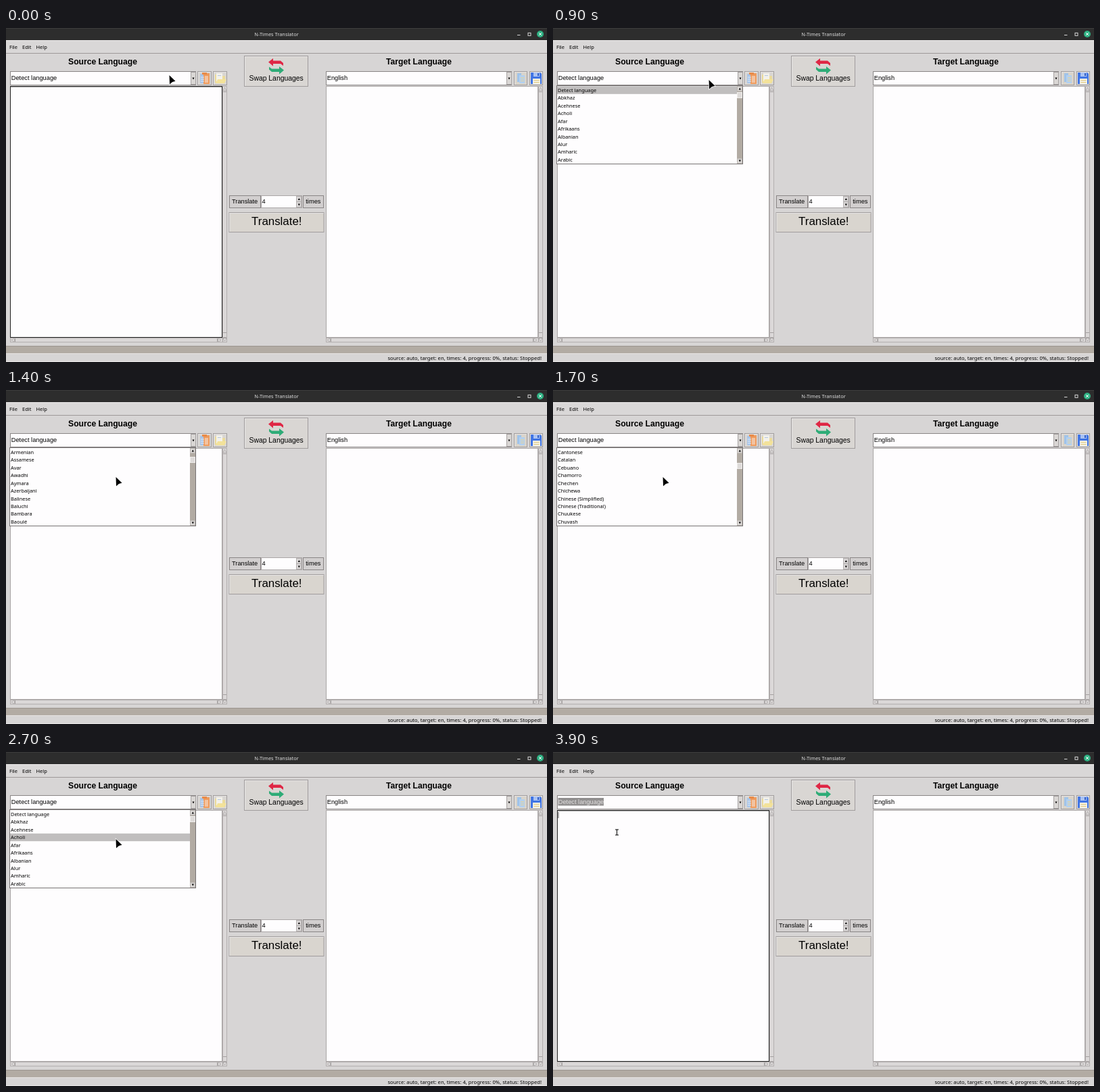
Recreate the animation shown at these times as an HTML page with a canvas. Size 800 by 495 pixels, loop 4 s.

```html
<!DOCTYPE html>
<html lang="en">
<head>
<meta charset="utf-8">
<title>N-Times Translator</title>
<style>
html, body { margin: 0; width: 800px; height: 495px; overflow: hidden; background: #d7d5d5; }
canvas { display: block; }
</style>
</head>
<body>
<canvas id="stage" width="800" height="495"></canvas>
<script>
const ctx = document.getElementById('stage').getContext('2d');
const SANS = '"Liberation Sans", Arial, sans-serif';
const NOTO = '"Noto Sans", sans-serif';
const LOOP = 4000, STEP = 100;
const OPEN = 700, CLOSE = 3500, FOCUS = 3700;
const ROWS = 10, ROW_H = 11.45, LIST_TOP = 86.4;

const languages = ('Detect language,Abkhaz,Acehnese,Acholi,Afar,Afrikaans,Albanian,Alur,Amharic,Arabic,' +
  'Armenian,Assamese,Avar,Awadhi,Aymara,Azerbaijani,Balinese,Baluchi,Bambara,Baoulé,Bashkir,Basque,' +
  'Batak Karo,Batak Simalungun,Batak Toba,Belarusian,Bemba,Bengali,Betawi,Bhojpuri,Bikol,Bosnian,' +
  'Breton,Bulgarian,Buryat,Cantonese,Catalan,Cebuano,Chamorro,Chechen,Chichewa,Chinese (Simplified),' +
  'Chinese (Traditional),Chuukese,Chuvash').split(',');

// Each key is [time, value, ...]
const mousePath = [[0, 241, 70], [500, 236, 73], [900, 230, 77], [1200, 184, 121], [1400, 162, 129],
  [2700, 162, 129], [3300, 105, 90], [3800, 94.5, 119], [LOOP, 94.5, 119]];
const scrollPath = [[0, 0], [1300, 0], [1650, 35], [1900, 35], [2300, 15], [2600, 0], [LOOP, 0]];

function sample(path, t) {
  const i = path.findIndex(key => key[0] > t);
  const a = path[i - 1], b = path[i];
  const k = (t - a[0]) / (b[0] - a[0]);
  return a.slice(1).map((v, n) => v + (b[n + 1] - v) * k);
}

function rect(x, y, w, h, color) {
  ctx.fillStyle = color;
  ctx.fillRect(x, y, w, h);
}

function box(x, y, w, h, fill, stroke = '#8d8989') {
  rect(x, y, w, h, stroke);
  rect(x + 1, y + 1, w - 2, h - 2, fill);
}

function text(str, x, y, size, { font = SANS, color = '#000', align = 'left', weight = 400 } = {}) {
  ctx.font = `${weight} ${size}px ${font}`;
  ctx.textAlign = align;
  ctx.fillStyle = color;
  ctx.fillText(str, x, y);
}

function poly(points, fill, stroke, width = 1) {
  ctx.beginPath();
  points.forEach(([x, y]) => ctx.lineTo(x, y));
  ctx.closePath();
  if (stroke) {
    ctx.strokeStyle = stroke;
    ctx.lineWidth = width;
    ctx.stroke();
  }
  if (fill) {
    ctx.fillStyle = fill;
    ctx.fill();
  }
}

function line(points, color, width = 1) {
  ctx.beginPath();
  points.forEach(([x, y]) => ctx.lineTo(x, y));
  ctx.strokeStyle = color;
  ctx.lineWidth = width;
  ctx.stroke();
}

// Triangle pointing along the unit vector (dx, dy)
function triangle(x, y, dx, dy, r, fill, stroke) {
  poly([[x + dx * r, y + dy * r], [x - dx * r + dy * r, y - dy * r + dx * r],
    [x - dx * r - dy * r, y - dy * r - dx * r]], fill, stroke, 0.7);
}

function button(x, y, w, h, fill = '#d9d6d3') {
  box(x, y, w, h, fill, '#a09c9c');
  rect(x + 1, y + 1, w - 2, 1, '#e6e4e4');
  rect(x + 1, y + 1, 1, h - 2, '#e6e4e4');
}

function titleBar() {
  rect(0, 0, 800, 18, '#2d2d2d');
  rect(0, 0, 800, 1, '#3c3c3c');
  text('N-Times Translator', 400, 12, 7.4, { font: NOTO, color: '#dedede', align: 'center' });
  rect(756, 10, 4.5, 1, '#d8d8d8');
  ctx.strokeStyle = '#d8d8d8';
  ctx.lineWidth = 1;
  ctx.strokeRect(772, 7.3, 4, 4);
  ctx.beginPath();
  ctx.arc(790, 9, 5, 0, 7);
  ctx.fillStyle = '#2fb183';
  ctx.fill();
  line([[788, 7], [792, 11]], '#fff');
  line([[792, 7], [788, 11]], '#fff');
}

function menuBar() {
  rect(0, 18, 800, 20, '#d9d7d7');
  rect(0, 18, 800, 1, '#efeded');
  rect(0, 37, 800, 1, '#9d9999');
  [['File', 5], ['Edit', 24], ['Help', 44.5]].forEach(([s, x]) => text(s, x, 31, 7.5, { font: NOTO }));
}

function combo(x, value, selected) {
  box(x, 64, 275, 21, '#fefdfe', '#8a8686');
  box(x + 267, 65, 8, 19, '#dad7d5', '#a5a1a1');
  triangle(x + 271, 75, 0, 1, 1.5, '#000');
  if (selected) rect(x + 1.5, 68, 67.5, 11.5, '#918f8f');
  text(value, x + 1.8, 77, 9.25, { color: selected ? '#e4e2e2' : '#000' });
}

function textArea(x, w, focused) {
  box(x, 86, w, 373, '#fefdfe', focused ? '#222' : '#a9a5a5');
  if (focused) rect(x, 87, w, 0.4, '#222');
  const bar = x + w, end = bar + 7;
  box(bar, 86, 7, 373, '#dbd8d8', '#b3afaf');
  box(x, 459, w + 7, 7, '#dbd8d8', '#b3afaf');
  rect(bar + 1, 94, 5, 1, '#a39f9f');
  rect(bar + 1, 451, 5, 1, '#a39f9f');
  [x + 7, end - 15, end - 7].forEach(edge => rect(edge, 460, 1, 5, '#a39f9f'));
  const edge = '#777373', fill = '#dedbdb';
  triangle(bar + 3.5, 90.5, 0, -1, 2, fill, edge);
  triangle(bar + 3.5, 462, 0, 1, 2, fill, edge);
  triangle(x + 4, 462.5, -1, 0, 2, fill, edge);
  triangle(end - 11, 462.5, 1, 0, 2, fill, edge);
}

function clipboardIcon() {
  button(283, 64, 21, 21);
  rect(287, 68, 7, 14, '#a9c4e6');
  rect(292, 67, 9, 16, '#ee9a5c');
  rect(290, 66, 7, 3, '#e88a48');
  rect(294, 71, 5, 10, '#f3c3a0');
  [72.5, 75.5, 78.5].forEach(y => rect(288, y, 5, 1, '#e4eefa'));
}

function folderIcon() {
  button(306, 64, 21, 21);
  poly([[309, 69], [315, 69], [317, 71], [324, 71], [324, 81], [309, 81]], '#ecdc9c');
  rect(311, 67, 9, 12, '#f3f1ea');
  rect(313, 70, 5, 1, '#b3c6df');
  poly([[313, 76], [326, 76], [323, 82], [310, 82]], '#f3e29a');
}

function copyIcon() {
  button(751, 64, 20, 21, '#d9d4cb');
  rect(756, 67, 6, 13, '#9fc3ea');
  rect(759, 70, 8, 12, '#b4d0ee');
  [73, 75.5, 78].forEach(y => rect(761, y, 5, 1, '#e3d3a0'));
}

function saveIcon() {
  button(774, 64, 20, 21);
  poly([[776, 66], [790, 66], [792, 68], [792, 83], [776, 83]], '#3f74e4');
  rect(780, 66, 9, 6, '#a9c2f3');
  rect(786, 67, 2, 4, '#2f5cc4');
  rect(779, 75, 11, 8, '#f3f1e6');
  rect(780.5, 77, 8, 1, '#e2c878');
  rect(780.5, 80, 8, 1, '#e2c878');
}

function middleColumn() {
  button(352, 41, 95, 46);
  poly([[388, 50.5], [395, 45], [395, 48.5], [406, 48.5], [410, 52], [410, 56], [406, 53], [395, 53], [395, 56.5]], '#df2745');
  poly([[411, 62.5], [404, 57], [404, 60.5], [393, 60.5], [389, 57.5], [389, 61.5], [393, 65], [404, 65], [404, 68.5]], '#2eac77');
  text('Swap Languages', 399.6, 78, 10.4, { align: 'center' });

  box(330, 248, 47, 19, '#d2cfcf', '#898585');
  text('Translate', 334, 260, 9.25);
  box(377, 248, 61, 19, '#fefdfe', '#aaa6a6');
  box(429, 249, 8, 17, '#d9d6d6', '#b5b1b1');
  rect(430, 257, 6, 1, '#aaa6a6');
  triangle(433.3, 253.5, 0, -1, 1.5, '#000');
  triangle(433.3, 262, 0, 1, 1.5, '#000');
  text('4', 378.5, 260, 9.25);
  box(439, 248, 31, 19, '#d2cfcf', '#898585');
  text('times', 443.3, 260, 9.25);

  button(329.5, 273, 141, 30, '#d9d5cf');
  text('Translate!', 400.3, 292, 16.9, { align: 'center' });
}

function footer() {
  rect(0, 471, 800, 12, '#b2aba3');
  rect(0, 471, 800, 1, '#9b958f');
  rect(0, 482, 800, 1, '#e6e3e1');
  rect(0, 494, 800, 1, '#e9e7e7');
  text('source: auto, target: en, times: 4, progress: 0%, status: Stopped!', 792, 491.5, 7.63,
    { font: NOTO, align: 'right' });
}

function popup(first, hovered) {
  box(5, 85, 276, 117, '#fefdfe', '#777373');
  for (let row = 0; row < ROWS; row++) {
    const y = LIST_TOP + row * ROW_H;
    if (first + row === hovered) rect(6, y, 266, ROW_H, '#c0bebe');
    text(languages[first + row], 7, y + 8.4, 7.4, { font: NOTO });
  }
  rect(272, 86, 8, 115, '#b2aba3');
  box(272, 86, 8, 8, '#dad7d5', '#bbb6b2');
  box(272, 193, 8, 8, '#dad7d5', '#bbb6b2');
  triangle(276.3, 90, 0, -1, 1.6, '#000');
  triangle(276.3, 197, 0, 1, 1.6, '#000');
  box(272, Math.round(95 + first * 0.36), 8, 9, '#dedbd9', '#f0eeec');
}

function arrowCursor(x, y) {
  poly([[x + 0.5, y], [x + 9.5, y + 8.8], [x + 5, y + 10], [x + 1, y + 13.5]], '#000', '#fff', 1.4);
}

function beamCursor(x, y) {
  rect(x - 0.5, y - 4, 1, 8, '#000');
  rect(x - 2.5, y - 4.5, 5, 1, '#000');
  rect(x - 2.5, y + 3.5, 5, 1, '#000');
}

function draw(now) {
  const t = Math.floor(now % LOOP / STEP) * STEP;
  const open = t >= OPEN && t < CLOSE;
  const [mx, my] = sample(mousePath, t);
  const first = Math.round(sample(scrollPath, t)[0] / 5) * 5;

  rect(0, 0, 800, 495, '#d7d5d5');
  titleBar();
  menuBar();
  text('Source Language', 143, 53.7, 12.15, { weight: 700, align: 'center' });
  text('Target Language', 610.5, 53.7, 12.15, { weight: 700, align: 'center' });
  combo(6, 'Detect language', t >= CLOSE);
  combo(473, 'English');
  clipboardIcon();
  folderIcon();
  copyIcon();
  saveIcon();
  textArea(6, 314, t < OPEN || t >= FOCUS);
  textArea(473, 314);
  middleColumn();
  footer();
  if (t >= FOCUS) rect(7.5, 89, 1, 9, '#555');
  if (open) popup(first, Math.max(0, Math.floor((my - LIST_TOP) / ROW_H)));
  (t >= CLOSE ? beamCursor : arrowCursor)(mx, my);
}

const start = performance.now();
function tick() {
  draw(performance.now() - start);
  requestAnimationFrame(tick);
}
tick();
</script>
</body>
</html>
```
